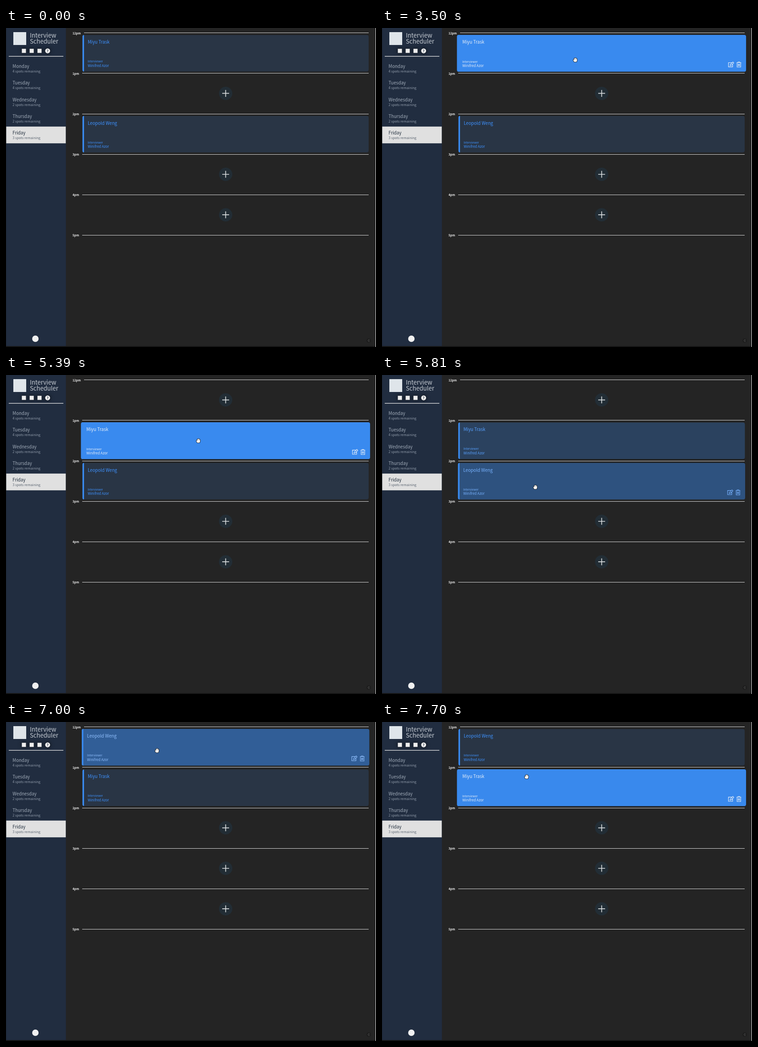
An HTML page with a canvas that plays this animation: 806 px wide and 695 px high, repeating every 7770 ms.

```html
<!DOCTYPE html>
<html lang="en">
<head>
<meta charset="utf-8">
<title>Interview Scheduler</title>
<style>
  html, body { margin: 0; width: 100%; height: 100%; overflow: hidden; background: #242424; }
  canvas { display: block; width: 806px; height: 695px; }
</style>
</head>
<body>
<canvas id="stage" width="806" height="695"></canvas>
<script>
const c = document.getElementById('stage').getContext('2d');
const LOOP = 7770, STEP = 70, FADE = 300;
const FONT = '"Noto Sans CJK JP", "Noto Sans CJK SC", "Noto Sans CJK", "Noto Sans", sans-serif';
const CARD = { x: 166.6, w: 623.4, h: 79.5 };
const INTERVIEWER = 'Winifred Azor';

const NAVY = [41, 53, 69], BLUE = [57, 138, 239], INK = [62, 146, 255], WHITE = [230, 238, 248];
const ORANGE = [156, 111, 48], DULL = [160, 150, 134], DULL_BAR = [62, 100, 150];

const DAYS = [['Monday', 4], ['Tuesday', 4], ['Wednesday', 2], ['Thursday', 2], ['Friday', 3]];
const HOURS = ['12pm', '1pm', '2pm', '3pm', '4pm', '5pm'];

// Each person: slot before and after the drop, hover periods, drag period, grab point.
const PEOPLE = [
  { name: 'Miyu Trask', from: 0, to: 1, hovers: [[2490, 3850], [5080, 5615], [7430, 9999]],
    drag: [3850, 5110], grab: [426, 69.5] },
  { name: 'Leopold Weng', from: 2, to: 0, hovers: [[5740, 6020], [6900, 7400]],
    drag: [6020, 6930], grab: [329, 238] }
];

// Pointer path: time, x, y
const PATH = [
  [560, 390, 684], [980, 200, 318], [1190, 200, 318], [1470, 141, 257], [1680, 141, 257],
  [2240, 314, 53], [2380, 309, 65], [2450, 309, 65], [2800, 421, 69], [3430, 421, 69],
  [3710, 421, 70], [3850, 420, 74], [4410, 419, 133], [4690, 419, 143], [5400, 419, 143],
  [5810, 334, 244], [5950, 329, 238], [6020, 329, 235], [6440, 329, 108], [6650, 329, 62],
  [7140, 329, 62], [7420, 320, 102], [7700, 315, 119]
];
const PRESSED = [[3850, 4830], [6020, 6650]];

const within = (t, [a, b]) => t >= a && t < b;
const clamp = v => Math.max(0, Math.min(1, v));
const ease = v => { v = clamp(v); return 1 - Math.pow(1 - v, 2.2) * (1 + 0.8 * v); };
const rgb = v => `rgb(${v.map(Math.round)})`;
const mix = (a, b, p) => a.map((v, i) => v + (b[i] - v) * p);
const lineY = slot => 10.7 + slot * 88.15;
const cardY = slot => lineY(slot) + 4.6;

function pointer(t) {
  if (t < PATH[0][0]) return null;
  const next = PATH.findIndex(p => p[0] > t);
  if (next < 0) return PATH[PATH.length - 1].slice(1);
  const a = PATH[next - 1], b = PATH[next], p = (t - a[0]) / (b[0] - a[0]);
  return [a[1] + (b[1] - a[1]) * p, a[2] + (b[2] - a[2]) * p];
}

function text(s, x, y, size, color, weight = 400) {
  c.font = `${weight} ${size}px ${FONT}`;
  c.fillStyle = color;
  c.fillText(s, x, y);
}
function rect(x, y, w, h, color, r = 0) {
  c.fillStyle = color;
  c.beginPath();
  c.roundRect(x, y, w, h, r);
  c.fill();
}
function disc(x, y, r, color) {
  c.fillStyle = color;
  c.beginPath();
  c.arc(x, y, r, 0, 7);
  c.fill();
}
function ring(x, y, r, width, color) {
  c.strokeStyle = color;
  c.lineWidth = width;
  c.beginPath();
  c.arc(x, y, r, 0, 7);
  c.stroke();
}
function stroke(d, color, width) {
  c.strokeStyle = color;
  c.lineWidth = width;
  c.stroke(new Path2D(d));
}
function at(x, y, draw) {
  c.save();
  c.translate(x, y);
  draw();
  c.restore();
}

function sidebar() {
  rect(0, 0, 130.5, 693, '#212d40');
  rect(16, 9, 28, 28, '#dfe5ea');
  text('Interview', 52, 21, 13.1, '#c6ccd3', 300);
  text('Scheduler', 52, 34, 13.1, '#c6ccd3', 300);
  c.save();
  c.shadowColor = '#000c';
  c.shadowBlur = 8;
  for (const x of [39, 56, 73]) rect(x - 4.5, 45.3, 9, 9, '#eee');
  disc(90.7, 49.8, 5.4, '#eee');
  c.restore();
  text('?', 88.7, 52.7, 7.5, '#212d40', 700);
  rect(6, 61, 119, 1.3, '#e8e8e8');
  rect(0, 214.7, 130.2, 36.5, '#e0e0e0');
  DAYS.forEach(([day, spots], i) => {
    const y = 87 + i * 36.25, active = day === 'Friday';
    text(day, 14.3, y, 9.7, active ? '#222f3e' : '#a0abb8');
    text(`${spots} spots remaining`, 14.3, y + 10.2, 7.35, active ? '#59636f' : '#939eac', 300);
  });
  disc(64, 677, 7, '#f0f0f0');
  rect(0, 0, 0.6, 693, '#1b222d');
}

function actions(color) {
  at(757.5, 64, () => stroke('M2 -4H-5.5V5H3.5V0M-2 2.5L-1.5 0L4 -5.5L6 -3.5L.5 2Z', color, 1.1));
  at(774.5, 64, () => stroke('M-5 -4H5M-2 -4V-5.5H2V-4M-4 -4V5.5H4V-4M-1.7 -1.5V3.5M0 -1.5V3.5M1.7 -1.5V3.5', color, 1));
}

function cardText(name, color) {
  text(name, 178, 19, 9.65, color, 500);
  text('Interviewer', 178, 60, 6.2, color, 300);
  text(INTERVIEWER, 178, 69.5, 7.45, color, 500);
}

function card(person, slot, t) {
  const dragging = within(t, person.drag);
  let hover = 0, icons = dragging;
  for (const period of person.hovers) {
    hover += ease((t - period[0]) / FADE) - ease((t - period[1]) / FADE);
    icons = icons || within(t, period);
  }
  const drag = dragging ? ease((t - person.drag[0] + STEP) / FADE) : 0;
  if (dragging) hover = 1;
  const fill = rgb(mix(mix(NAVY, BLUE, hover), ORANGE, drag));
  const ink = rgb(mix(mix(INK, WHITE, hover), DULL, drag));
  const scale = 1 + 0.01 * hover, middle = CARD.x + CARD.w / 2;
  at(middle, cardY(slot) + CARD.h / 2, () => {
    c.scale(scale, scale);
    c.translate(-middle, -CARD.h / 2);
    rect(CARD.x, 0, CARD.w, CARD.h, fill, 4);
    rect(CARD.x, 0, 3.4, CARD.h, rgb(mix(BLUE, DULL_BAR, drag)), [4, 0, 0, 4]);
    cardText(person.name, ink);
    if (icons) actions(ink);
  });
}

function emptySlot(slot, targeted) {
  const y = lineY(slot) + 43.6;
  if (targeted) rect(CARD.x, cardY(slot), CARD.w, CARD.h, '#028080', 4);
  else disc(478.5, y, 14.5, '#222d35');
  at(478.5, y, () => stroke('M-7.5 0H7.5M0 -7.5V7.5', '#d8dcde', 1.7));
}

function ghost(person, [x, y]) {
  at(x - person.grab[0], cardY(person.from) + y - person.grab[1], () => {
    c.globalAlpha = 0.92;
    c.shadowColor = '#0007';
    c.shadowBlur = 6;
    rect(CARD.x, 0, CARD.w, CARD.h, rgb(BLUE), 4);
    c.shadowColor = 'transparent';
    cardText(person.name, '#eaf1fa');
    actions('#dce8f6');
  });
}

function arrow() {
  const shape = new Path2D('M0 0V8.6L2 6.9L3.3 9.6L4.8 8.9L3.5 6.3L6 6.1Z');
  c.lineJoin = 'round';
  c.fillStyle = '#111';
  c.fill(shape);
  c.strokeStyle = '#e4e4e4';
  c.lineWidth = 0.9;
  c.stroke(shape);
}
function hand() {
  const shape = new Path2D('M-2.5 4.5L-4.5 .5L-3.5 -.5L-2.4 .5V-3L-1 -3.6L.2 -4L1.7 -3.5L3 -2.5L3.8 -1.5V1.5L2.7 4.5Z');
  c.lineJoin = 'round';
  c.strokeStyle = '#111';
  c.lineWidth = 1.6;
  c.stroke(shape);
  c.fillStyle = '#fff';
  c.fill(shape);
  stroke('M-.7 -2.8V-.5M1 -2.8V-.5M2.5 -2V-.5', '#555', 0.5);
}

function cursor(t, [x, y], dragged) {
  if (PRESSED.some(p => within(t, p))) {
    ring(x, y, 20.5, 4, '#000');
    ring(x, y, 20.3, 1.5, '#fff');
  }
  const hovering = PEOPLE.some(p => p.hovers.some(h => within(t, h)));
  at(x, y - (dragged ? 1 : 0), () => {
    if (hovering && !dragged) return hand();
    arrow();
    if (!dragged) return;
    disc(5, 12, 4.7, '#2aa528');
    at(5, 12, () => stroke('M-2.4 0H2.4M0 -2.4V2.4', '#fff', 1.4));
  });
}

function draw(t) {
  rect(0, 0, 806, 695, '#242424');
  sidebar();
  rect(0, 693, 806, 2, '#151515');
  rect(805, 0, 1, 695, '#dcdcdc');
  disc(790, 681, 5, '#1e1e1e');
  at(790, 681, () => stroke('M1 -3L-2 0L1 3Z', '#454545', 1));

  const pos = pointer(t);
  const dragged = PEOPLE.find(p => within(t, p.drag));
  const slotOf = p => t < p.drag[1] ? p.from : p.to;
  const over = dragged ? Math.floor((pos[1] - lineY(0)) / 88.15) : -1;

  HOURS.forEach((hour, slot) => {
    const x = slot ? 166 : 170;
    text(hour, 145, lineY(slot) + 3, 6.4, '#f2f2f2', 700);
    rect(x, Math.floor(lineY(slot)), 790 - x, 1, '#d4d4d4');
    if (slot === 5) return;
    const person = PEOPLE.find(p => slotOf(p) === slot);
    if (person) card(person, slot, t);
    else emptySlot(slot, slot === over);
  });
  if (dragged) ghost(dragged, pos);
  if (pos) cursor(t, pos, dragged);
}

function frame() {
  const t = performance.now() % LOOP;
  draw(Math.floor(t / STEP) * STEP);
  requestAnimationFrame(frame);
}
frame();
</script>
</body>
</html>
```
